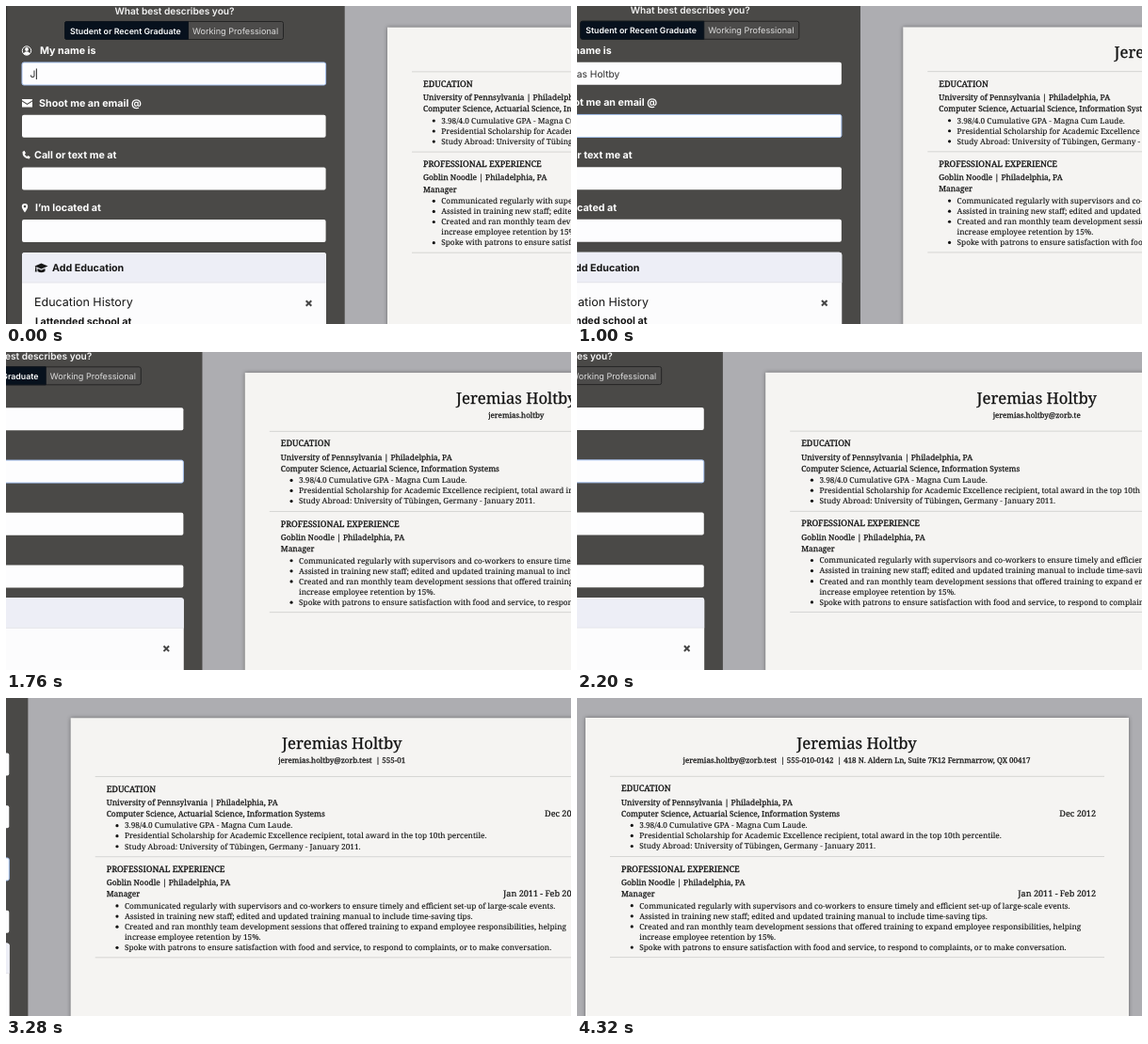
Animation of 600 by 338 pixels, one loop 4360 ms. Source, as an HTML page:

```html
<!DOCTYPE html>
<html lang="en">
<head>
<meta charset="utf-8">
<title>Resume builder</title>
<style>
html, body { margin: 0; width: 100%; height: 100%; overflow: hidden; background: #adadb1; }
svg { display: block; width: 600px; height: 338px; }
text { text-rendering: geometricPrecision; white-space: pre; }
#form text { font-family: Inter, Roboto, sans-serif; }
#paper text { font-family: "Noto Serif", serif; font-size: 8.27px; fill: #121212; stroke: #121212; stroke-width: .12px; }
#paper .strong { font-size: 8.4px; stroke-width: .25px; }
#paper .date { font-size: 9.1px; stroke-width: .2px; }
#paper .head { font-size: 9.05px; stroke-width: .32px; }
#paper #title { font-size: 16.7px; stroke-width: .25px; }
#paper #contact { font-size: 8px; stroke-width: .25px; }
#sheet { fill: #f5f4f2; filter: drop-shadow(0 0 2px #0006); }
.rule { stroke: #d5d5d3; }
.label { font-weight: 700; font-size: 10.7px; fill: #fff; }
.dark, #form .label.dark { fill: #161616; }
.field { fill: #fdfdfe; }
.field.on { stroke: #a6c2f0; }
.value { font-size: 10.25px; fill: #2a2a2a; }
.icon { fill: #fff; }
</style>
</head>
<body>
<svg viewBox="0 0 600 338">
  <rect width="600" height="338" fill="#adadb1"/>
  <g id="form">
    <rect y="-5" width="359.7" height="360" fill="#4a4947"/>
    <rect y="-5" width="1.2" height="360" fill="#333231"/>
    <text x="179" y="8.6" text-anchor="middle" font-size="10.15" font-weight="600" fill="#f4f4f4">What best describes you?</text>
    <rect x="62.5" y="16.5" width="232" height="19" rx="2" fill="#4c4b4a" stroke="#242424"/>
    <path d="M193.5 16.5H64.5a2 2 0 0 0-2 2v15a2 2 0 0 0 2 2H193.5z" fill="#07111d" stroke="#0d141c"/>
    <text x="68" y="29.5" font-size="8.8" font-weight="600" fill="#fff">Student or Recent Graduate</text>
    <text x="198" y="29.5" font-size="9.1" fill="#dcdcdc">Working Professional</text>

    <circle cx="22" cy="47.5" r="4.7" fill="none" stroke="#fff"/>
    <circle class="icon" cx="22" cy="46" r="1.9"/>
    <path class="icon" d="M18.5 50.5q3.5-4.5 7 0q-3.5 3-7 0z"/>
    <path class="icon" d="M17 99h11v1.3l-5.5 3.5L17 100.3zM17 101.5l5.5 3.5l5.5-3.5v6H17z"/>
    <path class="icon" d="M17.5 155l2-1.2l1.5 2.6l-1.2 1.2q.9 1.7 2.5 2.5l1.2-1.2l2.3 1.6l-1.2 2q-7.4-.5-7.1-7.5z"/>
    <path class="icon" fill-rule="evenodd" d="M20 219.5q-3.2-4.5-3.2-6.3a3.2 3.2 0 0 1 6.4 0q0 1.8-3.2 6.3zM20 211.8a1.3 1.3 0 1 0 .01 0z"/>

    <g id="fields"></g>

    <path d="M17 355V265a3 3 0 0 1 3-3H337a3 3 0 0 1 3 3V355z" fill="#fcfcfd"/>
    <path d="M17 294V265a3 3 0 0 1 3-3H337a3 3 0 0 1 3 3V294z" fill="#edeef6"/>
    <path d="M17 294H340" stroke="#dddde4" stroke-width=".7"/>
    <path class="dark" d="M30.5 276.5l7-3l7 3l-7 3zM33.5 279l4 1.7l4-1.7v3q-4 2.5-8 0zM31.3 277h.9l.5 5.5h-1.9z"/>
    <text class="label dark" x="49" y="282">Add Education</text>
    <text x="30" y="319" font-size="12.5" class="dark">Education History</text>
    <path d="M318.7 313.2l5.6 5.6m0-5.6l-5.6 5.6" stroke="#454545" stroke-width="2"/>
    <text class="label dark" x="31" y="338.5">I attended school at</text>
  </g>

  <g id="paper">
    <rect id="sheet" x="9" y="21" width="577" height="360"/>
    <text id="title" x="297" y="54" text-anchor="middle"></text>
    <text id="contact" x="297" y="69.2" text-anchor="middle"></text>
    <g id="body"></g>
  </g>
</svg>
<script>
const $ = id => document.getElementById(id);
const LOOP = 4360, STEP = 40, PAN = 396, LIFT = 1.7, RAMP = 1037, PAN_END = 4288;

// Each field types one character per `step` ms from `start`; it has focus from `focus` on.
const fields = [
  { label: "My name is", x: 36, y: 60, text: "Jeremias Holtby", start: 0, step: 58, focus: 0 },
  { label: "Shoot me an email @", x: 35, y: 115.7, text: "jeremias.holtby@zorb.test", start: 1025, step: 52, focus: 930 },
  { label: "Call or text me at", x: 30, y: 171.4, text: "555-010-0142", start: 2640, step: 110, focus: 2400 },
  { label: "I’m located at", x: 31, y: 227.1, text: "418 N. Aldern Ln, Suite 7K12 Fernmarrow, QX 00417", start: 3880, step: 8, focus: 3865 }
];

$("fields").innerHTML = fields.map(f => `
  <text class="label" x="${f.x}" y="${f.y - 9}">${f.label}</text>
  <rect class="field" x="17" y="${f.y}" width="322.6" height="24" rx="2"/>
  <text class="value" x="25.5" y="${f.y + 16}"></text>`).join("") +
  '<rect id="caret" width="1" height="11.5" fill="#222"/>';
const boxes = document.querySelectorAll(".field");
const values = document.querySelectorAll(".value");

const line = (x, y, s, cls = "", anchor = "start") =>
  `<text class="${cls}" x="${x}" y="${y}" text-anchor="${anchor}">${s}</text>`;
const rule = y => `<path class="rule" d="M35 ${y}H560"/>`;
const item = (y, s) => `<circle cx="58.3" cy="${y - 2.8}" r="1.6" fill="#121212"/>` + line(66.3, y, s);

$("body").innerHTML = [
  rule(83.3),
  line(47, 99.4, "EDUCATION", "head"),
  line(47, 113.8, "University of Pennsylvania | Philadelphia, PA", "strong"),
  line(47, 125.7, "Computer Science, Actuarial Science, Information Systems", "strong"),
  line(551, 125.7, "Dec 2012", "date", "end"),
  item(138.2, "3.98/4.0 Cumulative GPA - Magna Cum Laude."),
  item(149.2, "Presidential Scholarship for Academic Excellence recipient, total award in the top 10th percentile."),
  item(160.3, "Study Abroad: University of Tübingen, Germany - January 2011."),
  rule(168.5),
  line(47, 184.5, "PROFESSIONAL EXPERIENCE", "head"),
  line(47, 198.8, "Goblin Noodle | Philadelphia, PA", "strong"),
  line(47, 211, "Manager", "strong"),
  line(551, 211, "Jan 2011 - Feb 2012", "date", "end"),
  item(223.5, "Communicated regularly with supervisors and co-workers to ensure timely and efficient set-up of large-scale events."),
  item(234.6, "Assisted in training new staff; edited and updated training manual to include time-saving tips."),
  item(245.7, "Created and ran monthly team development sessions that offered training to expand employee responsibilities, helping"),
  line(66.3, 256.8, "increase employee retention by 15%."),
  item(267.9, "Spoke with patrons to ensure satisfaction with food and service, to respond to complaints, or to make conversation."),
  rule(275.6)
].join("");

// Pan progress: constant speed with an equal soft start and stop.
function pan(t) {
  const area = PAN_END - RAMP;
  if (t >= PAN_END) return 1;
  if (t < RAMP) return t * t / (2 * RAMP * area);
  if (t > area) return 1 - (PAN_END - t) ** 2 / (2 * RAMP * area);
  return (t - RAMP / 2) / area;
}

const typed = (f, t) => t < f.start ? "" : f.text.slice(0, 1 + Math.floor((t - f.start) / f.step));

function draw(t) {
  const p = pan(t);
  const now = fields.map(f => typed(f, t));
  const active = fields.filter(f => t >= f.focus).length - 1;

  $("form").setAttribute("transform", `translate(${-PAN * p} ${-LIFT * p})`);
  $("paper").setAttribute("transform", `translate(${PAN * (1 - p)} ${LIFT * (1 - p)})`);
  $("body").setAttribute("transform", `translate(0 ${now[1] ? 0 : -15.1})`);

  fields.forEach((f, i) => {
    values[i].textContent = now[i];
    boxes[i].classList.toggle("on", i === active);
  });
  $("caret").setAttribute("x", 26 + values[active].getComputedTextLength());
  $("caret").setAttribute("y", fields[active].y + 6.5);
  $("title").textContent = now[0];
  $("contact").textContent = now.slice(1).filter(Boolean).join("\u00a0 | ");
}

const origin = performance.now();
function tick() {
  const t = (performance.now() - origin) % LOOP;
  draw(Math.floor(t / STEP) * STEP);
  requestAnimationFrame(tick);
}
tick();
</script>
</body>
</html>
```
